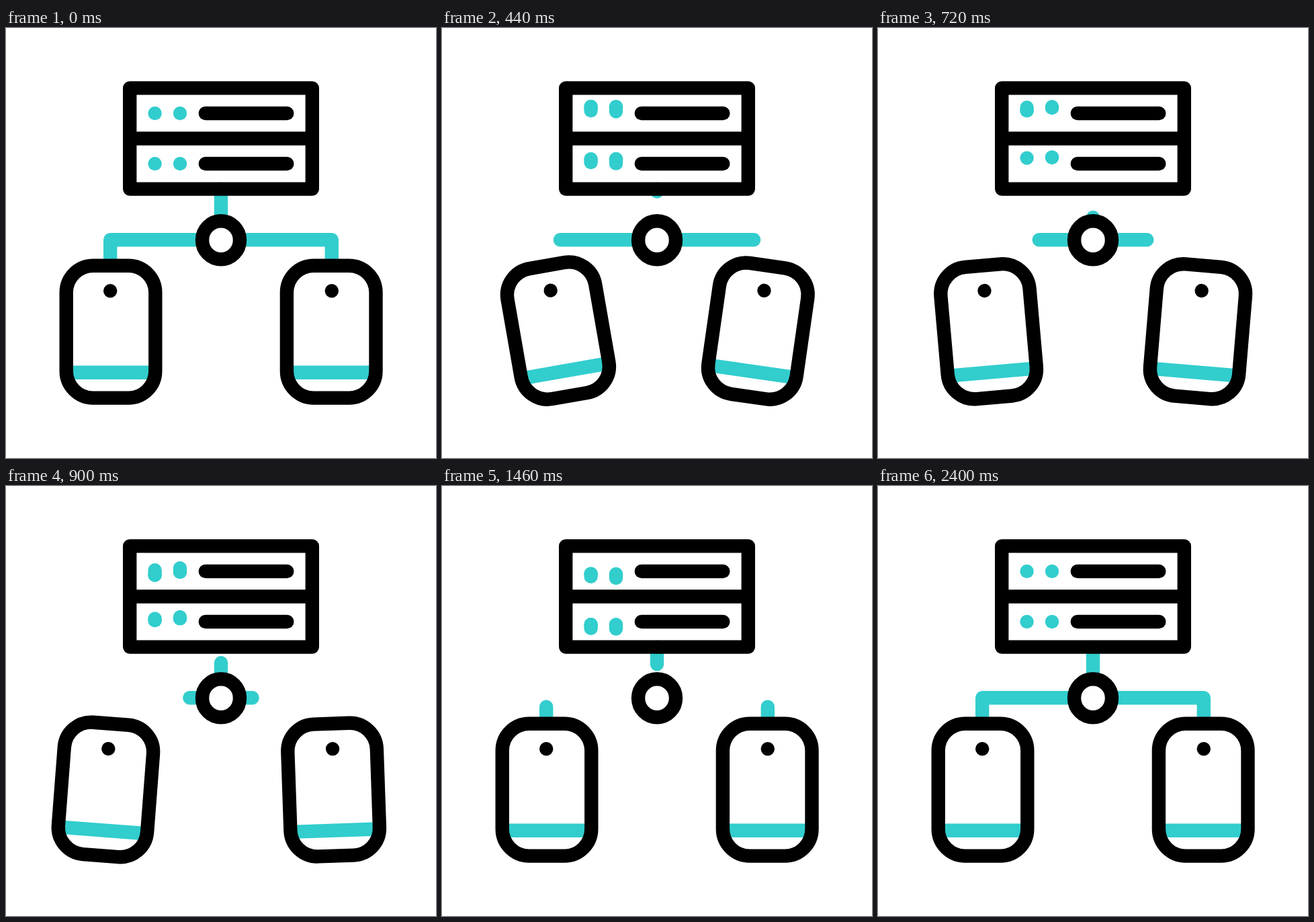
An HTML page with a canvas that plays this animation: 640x640 px, repeating every 2420 ms.

```html
<!DOCTYPE html>
<html lang="en">
<head>
<meta charset="utf-8">
<title>Server and devices</title>
<style>
  html, body { margin: 0; width: 100%; height: 100%; overflow: hidden; background: #fff; }
  canvas { display: block; width: 640px; height: 640px; }
</style>
</head>
<body>
<canvas id="stage" width="640" height="640"></canvas>
<script>
const ctx = document.getElementById('stage').getContext('2d');
const LOOP = 2420, STEP = 20, STROKE = 20.4;
const BLACK = '#000', TEAL = '#32cdcd';

const clamp = (v) => Math.min(1, Math.max(0, v));
const smooth = (v) => v * v * (3 - 2 * v);
const mix = (a, b, k) => a + (b - a) * k;
const ramp = (t, t0, t1) => clamp((t - t0) / (t1 - t0));

// Eased value from [time, value] keys.
function track(keys, t) {
  if (t <= keys[0][0]) return keys[0][1];
  for (let i = 1; i < keys.length; i++) {
    const [t0, v0] = keys[i - 1], [t1, v1] = keys[i];
    if (t < t1) return mix(v0, v1, smooth(ramp(t, t0, t1)));
  }
  return keys[keys.length - 1][1];
}

function line(color, points, cap = 'round') {
  ctx.strokeStyle = color;
  ctx.lineCap = cap;
  ctx.beginPath();
  points.forEach(([x, y]) => ctx.lineTo(x, y));
  ctx.stroke();
}

function disc(color, x, y) {
  ctx.fillStyle = color;
  ctx.beginPath();
  ctx.arc(x, y, STROKE / 2, 0, Math.PI * 2);
  ctx.fill();
}

// Indicator lights: the head leads the bounce and the tail follows.
const bounce = (start, top, hold, low, peak, back, end) =>
  [[start, 0], [top, peak], [hold, peak], [low, 11], [back, 11], [end, 0]];
const lights = [
  { x: 221.6, y: 127, head: bounce(0, 430, 515, 1090, -10, 1180, 1640), tail: bounce(300, 626, 626, 1267, -10, 1290, 1760) },
  { x: 259, y: 127, head: bounce(0, 475, 626, 1157, -10, 1200, 1650), tail: bounce(320, 670, 670, 1384, -10, 1390, 1790) },
  { x: 221.6, y: 202, head: bounce(0, 610, 740, 1151, -8.5, 1200, 1650), tail: bounce(320, 700, 710, 1370, -8.5, 1380, 1790) },
  { x: 259, y: 202, head: bounce(0, 660, 788, 1150, -9.5, 1200, 1660), tail: bounce(400, 758, 758, 1405, -9.5, 1410, 1800) }
];

function drawLight({ x, y, head, tail }, t) {
  const a = y + track(head, t), b = y + track(tail, t);
  disc(TEAL, x, a);
  if (Math.abs(a - b) > 0.05) line(TEAL, [[x, a], [x, b]]);
}

// Side cables are measured from the bend: negative is down to the phone.
const BEND_Y = 315.3, CABLE_START = -38.4, CABLE_END = 137;

function drawCable(x, dir, t) {
  const at = (u) => u < 0 ? [x, BEND_Y - u] : [x + dir * u, BEND_Y];
  let from = CABLE_START, to = CABLE_END;
  if (t < 1130) from = mix(CABLE_START, CABLE_END, smooth(t / 1130));
  else to = mix(CABLE_START, CABLE_END, ramp(t, 1300, LOOP));
  if (to - from < 0.01) return;
  const points = [at(from)];
  if (from < 0 && to > 0) points.push([x, BEND_Y]);
  points.push(at(to));
  line(TEAL, points);
}

function drawStem(t) {
  const top = 239.6, bottom = 287, p = t % (LOOP / 2);
  let from = bottom, to = top;
  if (p < 530) from = mix(bottom, top, smooth(p / 530));
  else to = mix(bottom, top, smooth(ramp(p, 600, 1200)));
  if (from - to > 0.01) line(TEAL, [[320, from], [320, to]]);
}

function drawPhone(pivotX, left, angle) {
  ctx.save();
  ctx.translate(pivotX, 353.7);
  ctx.rotate(angle * Math.PI / 180);
  ctx.translate(-pivotX, -353.7);
  line(TEAL, [[left + 3, 512.8], [left + 129.6, 512.8]], 'butt');
  ctx.strokeStyle = BLACK;
  ctx.beginPath();
  ctx.roundRect(left, 353.7, 132.6, 196.9, 40);
  ctx.stroke();
  disc(BLACK, pivotX, 391.2);
  ctx.restore();
}

function drawServer(t) {
  ctx.strokeStyle = BLACK;
  ctx.strokeRect(184.2, 89.4, 271.6, 150.2);
  line(BLACK, [[184.2, 164.5], [455.8, 164.5]], 'butt');
  for (const y of [127, 202]) line(BLACK, [[296.8, y], [418.3, y]]);
  lights.forEach((light) => drawLight(light, t));
}

function drawRing() {
  ctx.strokeStyle = BLACK;
  ctx.beginPath();
  ctx.ellipse(320, 315.8, 28, 28.5, 0, 0, Math.PI * 2);
  ctx.stroke();
}

const swing = (first, second) => [[0, 0], [585, first], [890, second], [1170, 0]];
const leftSwing = swing(-11.7, 4.4), rightSwing = swing(9.6, -2);

function draw(t) {
  ctx.fillStyle = '#fff';
  ctx.fillRect(0, 0, 640, 640);
  ctx.lineWidth = STROKE;
  ctx.lineJoin = 'round';
  drawCable(155.2, 1, t);
  drawCable(484.8, -1, t);
  drawStem(t);
  drawServer(t);
  drawRing();
  drawPhone(155.2, 89.7, track(leftSwing, t));
  drawPhone(484.8, 417.9, track(rightSwing, t));
}

const start = performance.now();
function tick() {
  const t = (performance.now() - start) % LOOP;
  draw(Math.floor(t / STEP) * STEP);
  requestAnimationFrame(tick);
}
tick();
</script>
</body>
</html>
```
